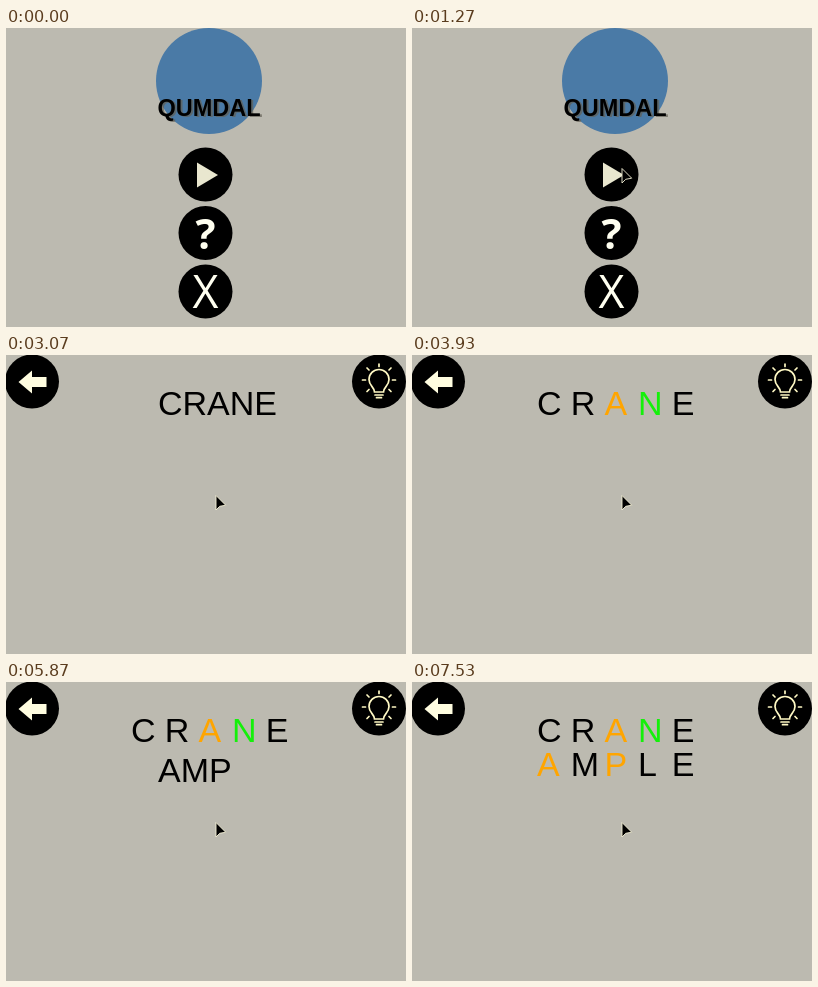
Recreate the animation shown at these times as an HTML page. Size 400 by 299 pixels, loop 8 s.

```html
<!DOCTYPE html>
<html lang="en">
<head>
<meta charset="utf-8">
<title>Word game</title>
<style>
  html, body { margin: 0; width: 100%; height: 100%; overflow: hidden; background: #bcbab0; }
  svg { display: block; width: 400px; height: 299px; }
  text { font-family: "Liberation Sans", Arial, sans-serif; }
  .icon { fill: #fffde0; }
  .line { fill: none; stroke: #fff9c4; stroke-width: 1.7; stroke-linecap: round; }
  .glyph { font-family: "Open Sans", sans-serif; text-anchor: middle; fill: #fffff0; }
  .title { font-weight: bold; font-size: 23.5px; text-anchor: middle; }
  #letters { font-size: 34px; }
</style>
</head>
<body>
<svg viewBox="0 0 400 299">
  <g id="menu">
    <circle cx="203" cy="53" r="53" fill="#4a7aa6"/>
    <text class="title" x="205" y="89" fill="#625f55" opacity=".7">QUMDAL</text>
    <text class="title" x="203" y="87.5">QUMDAL</text>
    <circle cx="199.5" cy="146.5" r="27"/>
    <path d="M191 134.5V159.5L212 147Z" fill="#e9e7cf"/>
    <circle cx="199.5" cy="205" r="27"/>
    <text class="glyph" x="199.5" y="220.5" font-size="42" font-weight="700">?</text>
    <circle cx="199.5" cy="263.5" r="27"/>
    <text class="glyph" x="199.5" y="280" font-size="45">X</text>
  </g>
  <g id="game">
    <circle cx="26" cy="26.5" r="27"/>
    <path class="icon" d="M12.5 27L26 15.5V22H40.5V32H26V38.5Z"/>
    <circle cx="373" cy="26.5" r="27"/>
    <path class="line" d="M368.5 37C368.5 32 363 31 363 24.5A10 10 0 0 1 383 24.5C383 31 377.5 32 377.5 37ZM369 40H377M370.5 42.7H375.5
      M373 9V11.5M356.5 25H359.5M386.5 25H389.5M361 13L363 15M385 13L383 15M361 36.5L363 34.5M385 36.5L383 34.5"/>
    <g id="letters"></g>
  </g>
  <path id="cursor" d="M0 0V14.5L3.7 10.8L9.7 9.7Z" stroke="#f4f1d6" stroke-width=".9"/>
</svg>
<script>
const LOOP = 8000, FRAME = 1000 / 15, GAME_START = 1470;
const ORANGE = '#ffa500', GREEN = '#14f00a', BLACK = '#000';
const $ = id => document.getElementById(id);

const rows = [
  { word: 'CRANE', typed: [2130, 2470, 2730, 2870, 3070], checked: 3670,
    typeY: 60.3, finalY: 60.3, colors: [BLACK, BLACK, ORANGE, GREEN, BLACK] },
  { word: 'AMPLE', typed: [5530, 5730, 5870, 6070, 6330], checked: 7200,
    typeY: 100.3, finalY: 93.8, colors: [ORANGE, BLACK, ORANGE, BLACK, BLACK] }
];

function letter(text, x, y, color = BLACK) {
  return `<text x="${x}" y="${y}" fill="${color}">${text}</text>`;
}

function drawRow(row, t) {
  if (t >= row.checked)
    return [...row.word].map((c, i) => letter(c, 125 + i * 33.7, row.finalY, row.colors[i])).join('');
  const count = row.typed.filter(time => t >= time).length;
  return letter(row.word.slice(0, count), 152, row.typeY);
}

function moveCursor(t) {
  const p = Math.min(1, Math.max(0, (t - 70) / 1130));
  const ease = 1 - (1 - p) ** 2;
  const x = 403 + (210 - 403) * ease;
  const y = 250 + (140.5 - 250) * p * p * (3 - 2 * p);
  $('cursor').setAttribute('transform', `translate(${x} ${y})`);
}

let last = -1;
function draw(now) {
  // Hold each pose for one step of 15 per second
  const step = Math.floor((now % LOOP) / FRAME + 0.1);
  if (step !== last) {
    last = step;
    const t = Math.round(step * FRAME / 10) * 10 % LOOP;
    const playing = t >= GAME_START;
    $('menu').style.display = playing ? 'none' : '';
    $('game').style.display = playing ? '' : 'none';
    $('letters').innerHTML = rows.map(row => drawRow(row, t)).join('');
    moveCursor(t);
  }
  requestAnimationFrame(() => draw(performance.now() - start));
}
const start = performance.now();
draw(0);
</script>
</body>
</html>
```
